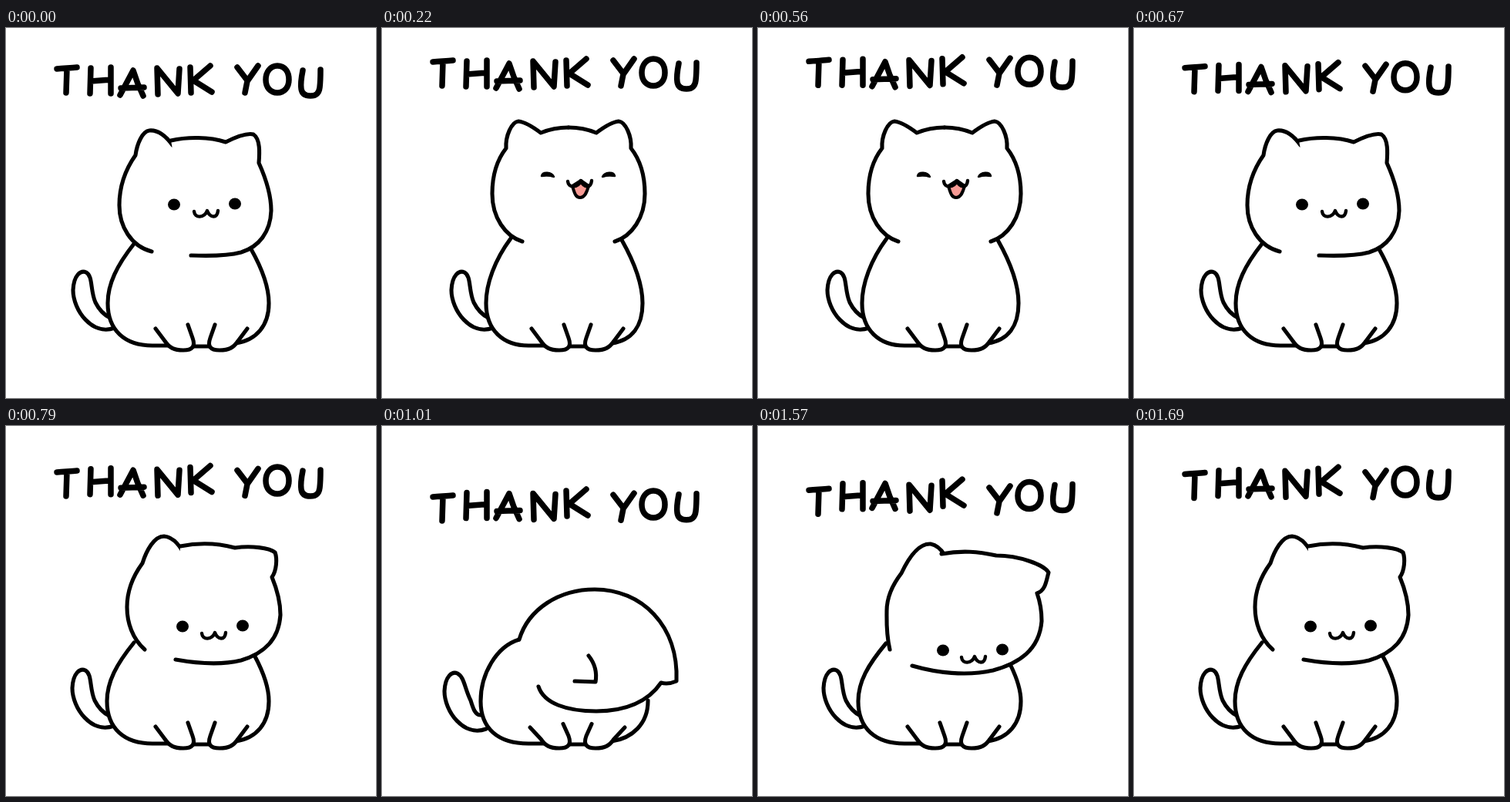
Recreate the animation shown at these times as an HTML page. Size 480 px wide and 480 px high, loop 1810 ms.

```html
<!DOCTYPE html>
<html lang="en">
<head>
<meta charset="utf-8">
<title>Thank you</title>
<style>
  html, body { margin: 0; height: 100%; overflow: hidden; background: #fff; }
  svg { display: block; width: 100vw; height: 100vh; }
  path { stroke: #000; stroke-linecap: round; stroke-linejoin: round; }
  #cat path { fill: #fff; stroke-width: 5.1; }
  #cat .line { fill: none; }
  #cat .lid { fill: #000; stroke-width: 2.4; }
  #cat .tongue { fill: #f79a94; stroke-width: 4; }
  #cat .mouth { fill: none; stroke-width: 4.4; }
  #text path { fill: none; stroke-width: 7.5; }
</style>
</head>
<body>
<svg viewBox="0 0 480 480" role="img" aria-label="THANK YOU">
  <g id="text"></g>
  <g id="cat"></g>
</svg>
<script>
const LOOP = 1810, STEPS = 16;
const lerp = (a, b, k) => a + (b - a) * k;
const path = (d, cls = '') => `<path class="${cls}" d="${d}"/>`;
const group = (transform, content) => `<g transform="${transform}">${content}</g>`;
const mirrored = (axis, half) => half + group(`translate(${2 * axis} 0) scale(-1 1)`, half);

// Blend two drawings that share the same structure; k may go past 1.
function mix(a, b, k) {
  const number = /-?\d+(\.\d+)?/g, ends = b.match(number);
  let i = 0;
  return a.replace(number, n => lerp(+n, +ends[i++], k).toFixed(2));
}

// (lx,ly) and (rx,ry) are the shoulders, left and right the widest points;
// crouch goes from 0 (sitting up) to 1 (bowing) and beyond.
function body({ lx, ly, left, rx, ry, right, crouch = 0 }) {
  const c = crouch, floor = 357, backX = lerp(lx, left, lerp(.65, .6, c));
  const tail =
    'M141 389C112 400 87 366 87 340C88 320 97 314 104 317' +
    `C113 322 ${109 + 4 * c} ${340 - 4 * c} ${116 + 5 * c} ${356 - 4 * c}` +
    `C${121 + 3 * c} ${366 - 4 * c} 127 372 135 ${376 - 5 * c}`;
  const paw =
    `M${194 - 2 * c} ${390 + c}L206 406C212 415 218 418 230 418` +
    `C242 418 246 413 242 402L${236 - c} ${385 + 1.5 * c}`;
  return group(`translate(${left - 132 - 2 * c} ${4 * c})`, path(tail)) +
    path(`M${lx} ${ly}C${backX} ${ly + lerp(28, 9, c)} ${left} ${lerp(332, 322, c)} ${left} ${floor}` +
      `C${left} 392 ${left + 22} 412 190 412L213 412`) +
    path(`M${rx} ${ry}C${lerp(rx, right, .6)} ${lerp(ry, floor, .35)} ${right} ${lerp(ry, floor, .7)} ${right} ${floor}` +
      `C${right} 386 325 405 298 409`) +
    path('M244 413L263 413', 'line') +
    mirrored(253.5, path(paw));
}

const eye = (x, y) => `<ellipse cx="${x}" cy="${y}" rx="8" ry="7.4"/>`;
const mouth = (x, y) => group(`translate(${x} ${y})`,
  path('M-17 1C-16 10 -4 10 0 0C4 10 13 10 14 0', 'mouth'));

const rest = body({ lx: 166, ly: 280, left: 132, rx: 318, ry: 287, right: 341 }) +
  path('M189 290C162 283 147 257 147 230C147 205 156 182 168 165C170 150 177 134 186 133C197 132 208 141 216 152') +
  path('M214 146C235 141 264 141 285 148C297 142 313 136 321 138C330 144 329 162 328 175' +
    'C337 195 344 217 344 237C343 265 328 284 305 291C290 295 265 296 240 295') +
  eye(218, 229) + eye(297, 228) + mouth(261, 237);

const nod = body({ lx: 166, ly: 281, left: 131, rx: 323, ry: 299, right: 341 }) +
  path('M180 290C164 276 157 255 157 235C157 213 166 193 177 178C182 162 192 143 205 143C218 144 228 158 232 170') +
  path('M226 156C250 151 275 152 297 158C318 155 342 158 349 164C352 172 351 188 345 196' +
    'C352 213 356 230 356 245C354 278 333 296 305 304C280 310 248 308 220 303') +
  eye(229, 260) + eye(307, 259) + mouth(271, 268);

const happy = body({ lx: 167, ly: 273, left: 135, rx: 311, ry: 275, right: 338 }) +
  mirrored(242, path('M182 277C160 270 143 246 143 215C143 190 150 170 161 156' +
    'C160 140 168 122 177 121C187 122 198 130 206 136C218 131 230 129 242 129')) +
  mirrored(254.5, path('M207 192C208 186 220 186 223 193C217 191 213 191 207 192Z', 'lid')) +
  path('M247 205C250 216 252 220 257 220C262 220 265 216 268 205L258 198Z', 'tongue') +
  mouth(258, 198);

// sink runs from 0 to 1 as the head settles at the bottom of the bow.
function bow(sink) {
  const head =
    path('M178 277C190 237 230 212 276 212C337 212 385 259 382 331C375 334 369 335 362 333' +
      'C345 358 315 370 278 370C240 370 210 360 203 338') +
    path('M268 298C276 308 279 320 277 332L250 331', 'line');
  return body({
    lx: 178 - sink, ly: 277 + 3 * sink, left: 128 - 3 * sink,
    rx: 345 + 2 * sink, ry: 356, right: 345 + 2 * sink, crouch: 1 + sink
  }) + group(`translate(0 ${2.5 * sink}) rotate(${sink} 177 277)`, head);
}

function catAt(n) {
  if (n > 0 && n < 6) return happy;
  if (n > 8 && n < 14) return bow(Math.min(1, (n - 9) / 2));
  return mix(rest, nod, n < 6 ? 0 : Math.min(n - 6, STEPS - n));
}

// Strokes of each letter, and how far it hangs when the word swings.
const letters = [
  ['M66 41C76 40 84 40 92 39M79 41L78 72', 10],
  ['M110 40L109 73M136 39L136 73M110 57L136 55', -1],
  ['M148 75L165 43C168 53 173 66 178 76M149 66L179 65', -6],
  ['M197 74L196 40L223 73L225 41', 1],
  ['M239 39L240 72M265 37L243 56L267 71', -5],
  ['M300 39L313 56M327 37L313 57L310 72', 8],
  ['M352 37C362 37 367 45 367 55C367 65 361 72 352 72C343 72 337 65 337 55C337 45 343 37 352 37Z', 0],
  ['M385 43C383 53 382 61 383 67C384 74 389 76 395 76C402 76 406 73 407 65C408 57 408 49 408 42', -3]
];

// Key points of the word: step, drop, swing.
const keys = [
  [0, 12, 0], [4, -6, 0], [7, 16, .3], [9, 47, .4],
  [11, 53, 1], [13, 53, 1], [15, 18, .35], [16, 12, 0]
];

function wordAt(n) {
  const i = keys.findIndex(key => key[0] > n), a = keys[i - 1], b = keys[i];
  const k = (n - a[0]) / (b[0] - a[0]);
  return [lerp(a[1], b[1], k), lerp(a[2], b[2], k)];
}

const cat = document.getElementById('cat');
const text = document.getElementById('text');
text.innerHTML = letters.map(([d]) => path(d)).join('');

// The clock ticks in hundredths of a second, so step lengths vary slightly.
const startOf = n => Math.round(n * 11.24) * 10;

function stepAt(t) {
  let n = STEPS - 1;
  while (startOf(n) > t) n--;
  return n;
}

let shown = -1;
function draw(t) {
  const n = stepAt(t % LOOP);
  if (n === shown) return;
  shown = n;
  cat.innerHTML = catAt(n);
  const [drop, swing] = wordAt(n);
  letters.forEach(([, hang], i) =>
    text.children[i].setAttribute('transform', `translate(0 ${drop + hang * swing})`));
}

const start = performance.now();
function tick() {
  draw(performance.now() - start);
  requestAnimationFrame(tick);
}
tick();
</script>
</body>
</html>
```
